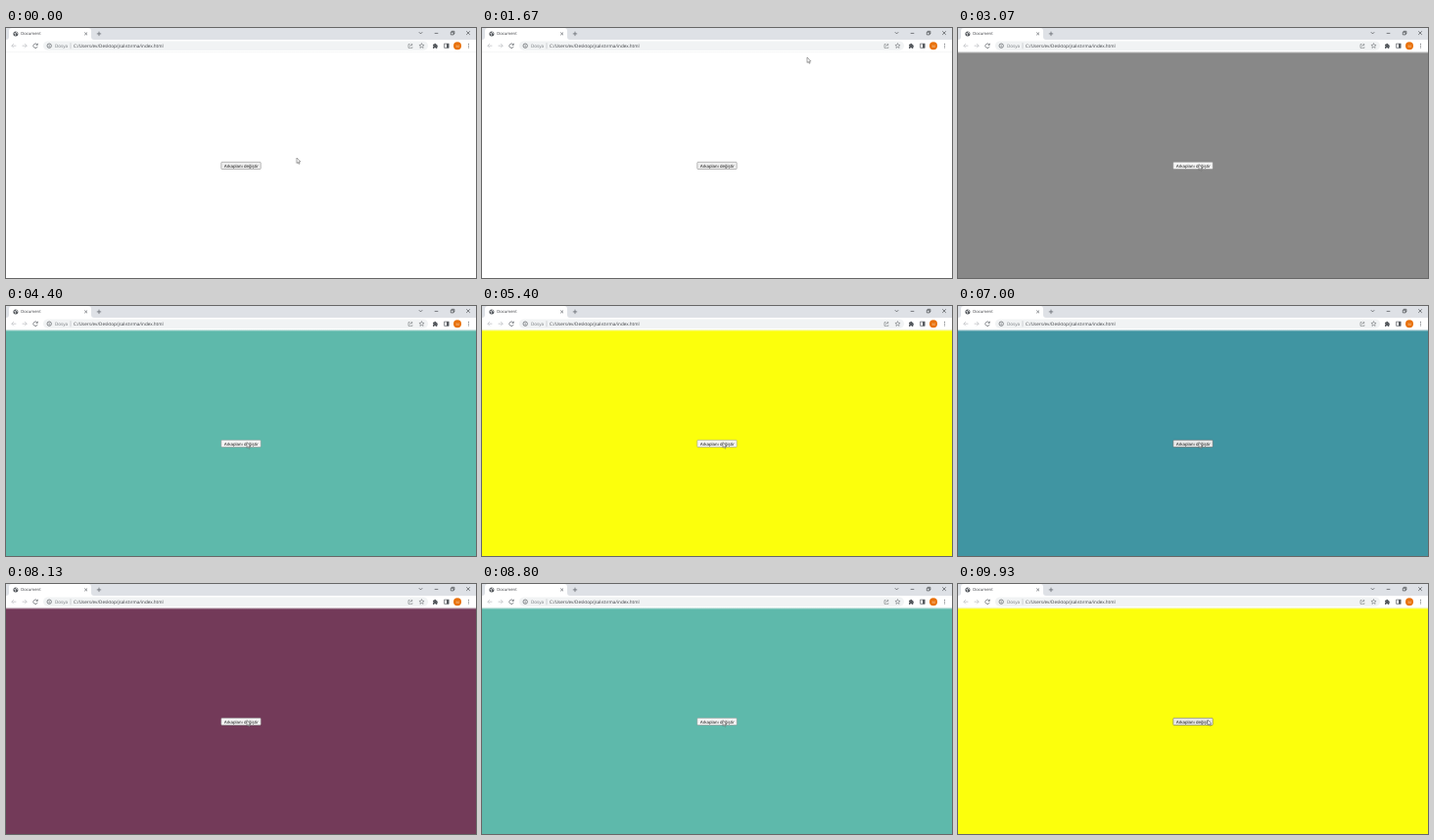
These frames come from a looping animation (480x256 px, 9990 ms). An HTML page:

```html
<!DOCTYPE html>
<html lang="tr">
<head>
<meta charset="utf-8">
<title>Document</title>
<style>
  html, body { margin: 0; width: 100%; height: 100%; overflow: hidden; background: #fff; }
  svg { display: block; width: 480px; height: 256px; }
  text {
    font-family: "Open Sans", "Noto Sans", sans-serif; font-size: 4.58px;
    fill: #3a3c40; text-rendering: geometricPrecision;
  }
  .icon { fill: none; stroke: #5a5e63; stroke-width: .7; }
  .thin { stroke-width: .5; }
  .win { stroke: #303337; stroke-width: .6; }
  .dim { stroke: #b9bcc0; }
  .solid { fill: #55595e; }
  #label { font: 4.53px "Liberation Sans", Arial, sans-serif; fill: #1c1c1c; }
</style>
</head>
<body>
<svg viewBox="0 0 480 256">
  <linearGradient id="edge" x2="0" y2="1">
    <stop stop-color="#f0f1f2"/>
    <stop offset="1" stop-color="#fff" stop-opacity="0"/>
  </linearGradient>

  <!-- tab strip -->
  <rect width="480" height="12" fill="#dee1e6"/>
  <path d="M0 12Q3 12 3 9V3Q3 0 6 0H84Q87 0 87 3V9Q87 12 90 12Z" fill="#fff"/>
  <circle cx="9.9" cy="5.9" r="2.5" fill="#55595e"/>
  <path d="M8.2 5.2L9.8 5.6L9.5 7.6M10.2 3.8L10.8 5L12.1 5.3" fill="none" stroke="#fff" stroke-width=".7"/>
  <text x="15.2" y="7.4" style="font-size:4.2px">Document</text>
  <path class="icon" d="M80.2 4.5L83 7.3M83 4.5L80.2 7.3M92.8 5.9H97.2M95 3.7V8.1"/>
  <path class="icon win" d="M421.8 4.2L423.5 5.9L425.2 4.2M437.7 5.4H441.3M470.2 3.3L473.8 6.9M473.8 3.3L470.2 6.9"/>
  <path class="icon win" d="M454.3 4.2H457V6.9H454.3ZM455.2 4.2V3.3H457.9V6H457"/>

  <!-- toolbar -->
  <rect y="12" width="480" height="13" fill="#fff"/>
  <rect x="38" y="13.4" width="393" height="9.6" rx="4.8" fill="#f1f3f4"/>
  <path class="icon dim" d="M10.4 18.2H5.8M7.9 16.1L5.8 18.2L7.9 20.3M16.6 18.2H21.2M19.1 16.1L21.2 18.2L19.1 20.3"/>
  <path class="icon" d="M31.9 17A2.2 2.2 0 1 0 32.2 18.9M32.3 15.7V17.4H30.6"/>
  <circle class="icon" cx="44.2" cy="18.2" r="2.2"/>
  <path class="icon" d="M44.2 17.8V19.5M44.2 16.8V17.3"/>
  <text x="50" y="19.8" style="fill:#74787d">Dosya</text>
  <path d="M66 15.2V21.2" stroke="#b9bcc0" stroke-width=".6"/>
  <text x="69" y="19.8">C:/Users/ev/Desktop/jsalıstırma/index.html</text>
  <path class="icon thin" d="M412.6 16.6H411V20.4H415V19.4M412.4 18.9Q412.8 17.1 414.6 17.1M413.8 15.9L415.2 17.1L413.8 18.3"/>
  <path id="star" class="icon thin"/>
  <path class="solid" d="M436 16.7H437.2A1 1 0 0 1 439.2 16.7H440.3V17.9A1 1 0 0 1 440.3 19.8V20.9H438.9A.8 .8 0 0 0 437.3 20.9H436V19.5A.8 .8 0 0 0 436 18Z"/>
  <rect class="icon" x="447.7" y="16.1" width="4.4" height="4.2"/>
  <rect class="solid" x="450" y="16.1" width="2.1" height="4.2"/>
  <circle cx="461" cy="18.2" r="4" fill="#e8710a"/>
  <text x="461" y="19.5" text-anchor="middle" style="font-size:3.6px;fill:#fbe3cf">M</text>
  <path d="M472.6 16.4v0M472.6 18.2v0M472.6 20v0" stroke="#55595e" stroke-linecap="round"/>

  <!-- page -->
  <rect id="page" y="24" width="480" height="232" fill="#fff"/>
  <rect y="24" width="480" height="2" fill="url(#edge)"/>
  <rect id="button" x="219.8" y="137.3" width="40.4" height="7.2" rx=".8" fill="#efefef" stroke="#767676" stroke-width=".5"/>
  <text id="label" x="240.2" y="142.6" text-anchor="middle">Arkaplanı değiştir</text>
  <path id="cursor" d="M0 0V5.5L1.2 4.4L2.1 6.3L3 5.9L2.1 4H3.8Z" fill="#fff" stroke="#333" stroke-width=".45"/>
</svg>
<script>
const LOOP = 9990, ARRIVE = 2400, LEAVE = 9650;
const $ = id => document.getElementById(id);
const clamp = v => Math.min(1, Math.max(0, v));

function play(el, frames) {
  el.animate(frames, { duration: LOOP, iterations: Infinity });
}

// each style holds until the next time
function hold(el, steps) {
  const end = [LOOP, steps[steps.length - 1][1]];
  play(el, [...steps, end].map(([t, style]) =>
    ({ ...style, offset: t / LOOP, easing: "steps(1, end)" })));
}

// every click takes the next background in turn
const colors = ["#888888", "#5eb9ab", "#fcff0c", "#4095a2", "#733a59"];
const clicks = [2930, 4270, 5400, 6470, 7600, 8270, 8670, 9130];
hold($("page"), [
  [0, { fill: "#ffffff" }],
  ...clicks.map((t, i) => [t, { fill: colors[i % colors.length] }])
]);

const idle = { fill: "#efefef", stroke: "#767676" };
const hover = { fill: "#e9e9e9", stroke: "#5a5a5a" };
const press = { fill: "#f5f5f5", stroke: "#8d8d8d" };
hold($("button"), [
  [0, idle], [ARRIVE, hover],
  ...clicks.flatMap(t => [[t - 140, press], [t + 160, hover]])
]);

// one wide curve to the button, then a short swing aside at the end
const bezier = (s, a, b, c, d) =>
  a * (1 - s) ** 3 + 3 * b * s * (1 - s) ** 2 + 3 * c * s * s * (1 - s) + d * s ** 3;

function cursorAt(t) {
  const u = clamp(t / ARRIVE), s = u * u * (3 - 2 * u);
  const v = clamp((t - LEAVE) / 280), swing = Math.sin(Math.PI * v);
  const x = bezier(s, 296.8, 700, 330, 246) + 7 * v + 36 * swing;
  const y = bezier(s, 133, 130, -130, 139.5) - 9 * swing;
  return { transform: `translate(${x}px, ${y}px)` };
}
play($("cursor"), Array.from({ length: 301 }, (_, i) => cursorAt(LOOP * i / 300)));

const star = Array.from({ length: 10 }, (_, i) => {
  const r = i % 2 ? 1.2 : 2.7, a = (i * 36 - 90) * Math.PI / 180;
  return `${424.5 + r * Math.cos(a)} ${18.3 + r * Math.sin(a)}`;
});
$("star").setAttribute("d", `M${star.join("L")}Z`);
</script>
</body>
</html>
```
